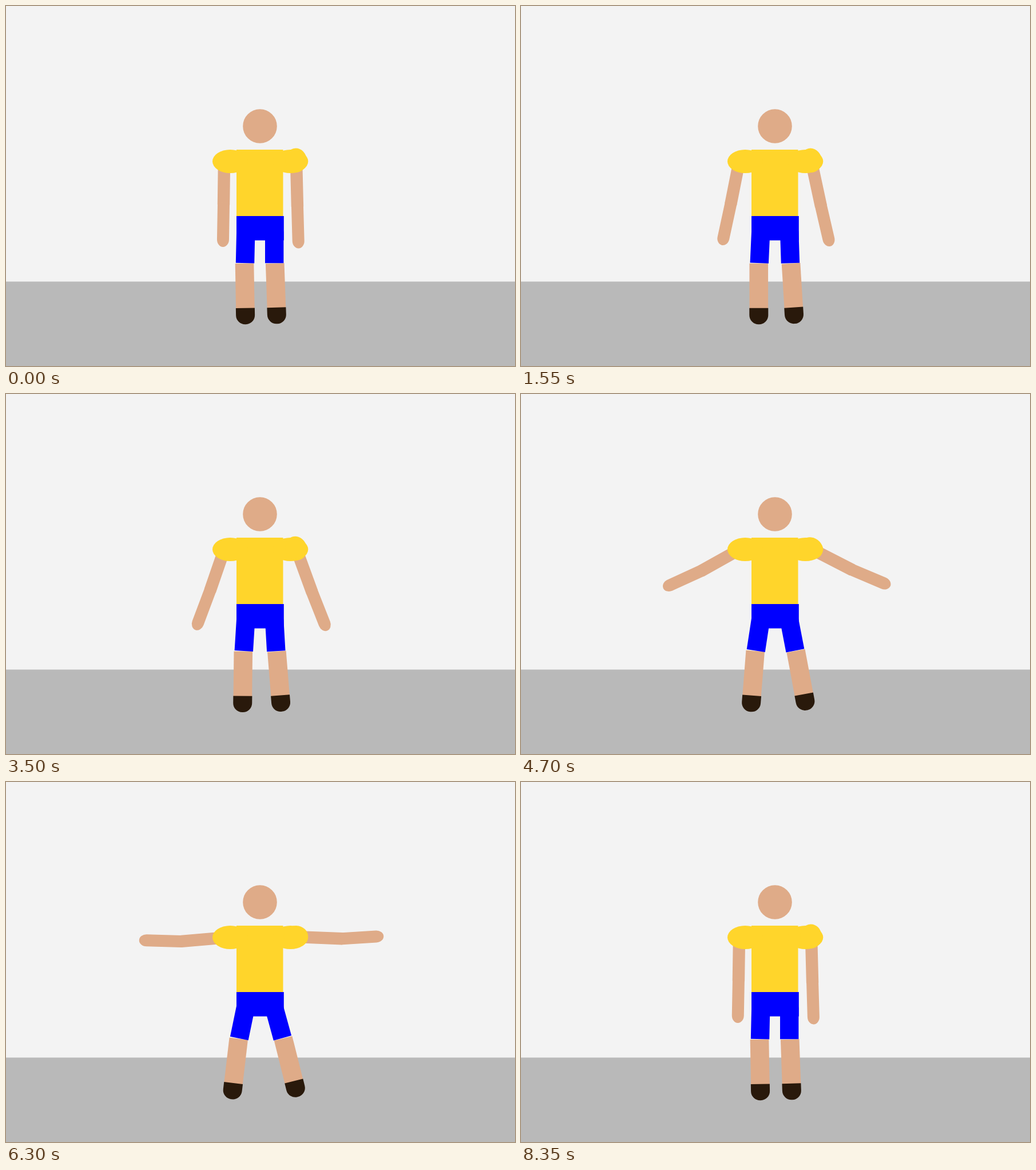
Animation, 890 px wide and 629 px high, one loop 8400 ms. Source, as an HTML page with a canvas:

```html
<!DOCTYPE html>
<html lang="en">
<head>
<meta charset="utf-8">
<title>Jumping jacks</title>
<style>
  html, body { margin: 0; width: 100%; height: 100%; overflow: hidden; background: #f3f3f3; }
  canvas { display: block; }
</style>
</head>
<body>
<canvas id="stage" width="890" height="629"></canvas>
<script>
const ctx = document.getElementById('stage').getContext('2d');
const LOOP = 8400, STEP = 50, CYCLE = 5000 / 3, LAG = 5;
const SKIN = '#dfab88', SHIRT = '#ffd52b', SHORTS = '#0000ff', SHOE = '#29190b';

// Angles are [at rest, added when fully open], in degrees away from straight down.
const arms = [
  { side: 1, x: 381.5, y: 272, upper: 75, lower: 74, swing: [0.75, 203], bend: [0.2, 15] },
  { side: -1, x: 507.5, y: 270.5, upper: 80, lower: 73, swing: [1.4, 207.5], bend: [0.2, 14] }
];
const legs = [
  { side: 1, x: 419.3, y: 392.5, thigh: 56.7, shin: 78.5, swing: [1.3, 25], shinSwing: [-1, 18.5] },
  { side: -1, x: 469.2, y: 395.5, thigh: 53.8, shin: 77.5, swing: [0, 37], shinSwing: [2, 29] }
];

const mix = ([rest, range], open) => rest + range * open;

function rect(color, x, y, w, h, radii = 0) {
  ctx.fillStyle = color;
  ctx.beginPath();
  ctx.roundRect(x, y, w, h, radii);
  ctx.fill();
}

function ellipse(color, x, y, rx, ry = rx) {
  ctx.fillStyle = color;
  ctx.beginPath();
  ctx.ellipse(x, y, rx, ry, 0, 0, 2 * Math.PI);
  ctx.fill();
}

function joint(x, y, degrees, draw) {
  ctx.save();
  ctx.translate(x, y);
  ctx.rotate(degrees * Math.PI / 180);
  draw();
  ctx.restore();
}

function drawArm(arm, open) {
  const tip = { x: 10.5, y: 13 };
  joint(arm.x, arm.y, arm.side * mix(arm.swing, open), () => {
    rect(SKIN, -10.7, 0, 21.4, arm.upper + 2, 2);
    joint(0, arm.upper, arm.side * mix(arm.bend, open), () =>
      rect(SKIN, -10.5, -3, 21, arm.lower + 3, [3, 3, tip, tip]));
  });
}

function drawLeg(leg, open) {
  const angle = mix(leg.swing, open);
  const rad = angle * Math.PI / 180;
  const kneeX = leg.x - leg.side * leg.thigh * Math.sin(rad);
  const kneeY = leg.y + leg.thigh * Math.cos(rad);
  joint(kneeX - leg.side, kneeY, leg.side * mix(leg.shinSwing, open), () => {
    rect(SKIN, -16.3, 0.5, 32.6, leg.shin);
    rect(SHOE, -16.5, leg.shin, 33, 28.5, [0, 0, 16, 16]);
  });
  joint(leg.x, leg.y, leg.side * angle, () =>
    rect(SHORTS, -16.2, -16, 32.4, leg.thigh + 16, [16, 16, 0, 0]));
}

function draw(time) {
  const open = (1 - Math.cos(2 * Math.PI * (time - LAG) / CYCLE)) / 2;
  rect('#f3f3f3', 0, 0, 890, 629);
  rect('#b9b9b9', 0, 481.5, 890, 147.5);

  for (const leg of legs) drawLeg(leg, open);
  rect(SHORTS, 403, 367, 82.8, 42.5);

  ellipse(SKIN, 444, 210, 29.8);
  for (const arm of arms) drawArm(arm, open);

  rect(SHIRT, 403, 251, 81.5, 116);
  ellipse(SHIRT, 392, 271.5, 31, 20.5);
  ellipse(SHIRT, 497.3, 271.5, 31, 20.5);
  // The right sleeve turns with its arm.
  const right = arms[1];
  joint(507, 269.7, -mix(right.swing, open), () => ellipse(SHIRT, 0, 0, 18.8, 21.2));
}

function tick() {
  const time = performance.now() % LOOP;
  draw(Math.floor(time / STEP) * STEP);
  requestAnimationFrame(tick);
}
tick();
</script>
</body>
</html>
```
